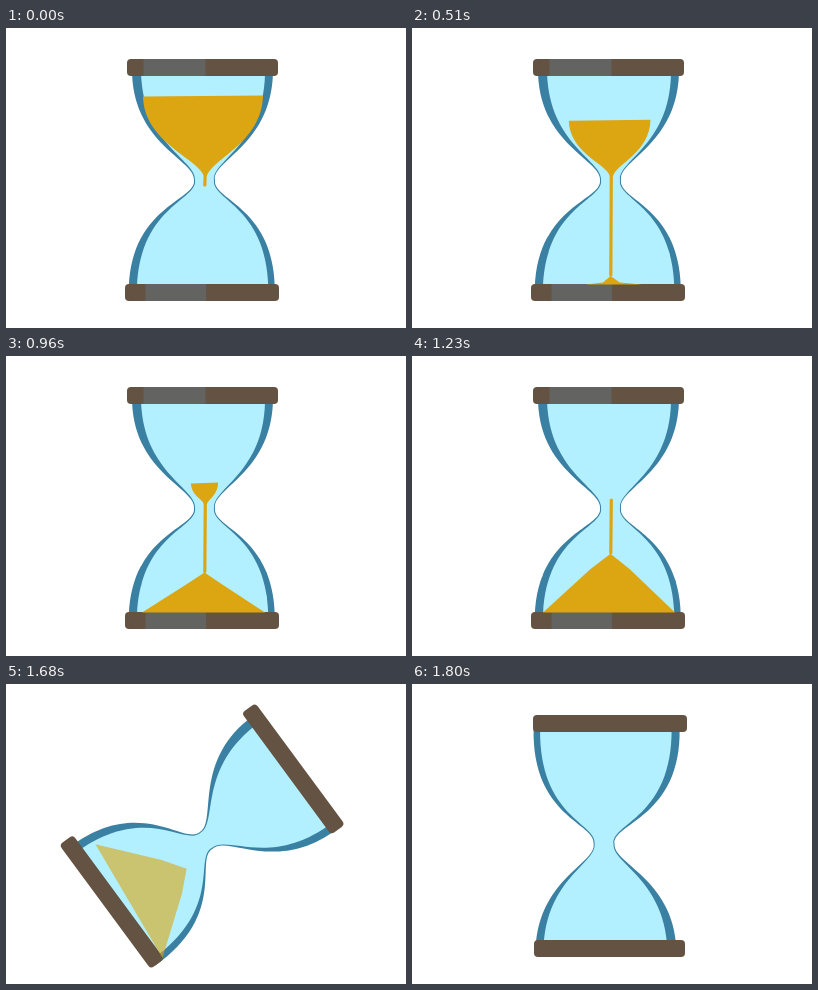
Write an HTML page that moves like this. It is 400x300 px and loops after 1.83 s.

```html
<!DOCTYPE html>
<html lang="en">
<head>
<meta charset="utf-8">
<title>Hourglass</title>
<style>
  html, body { margin: 0; width: 100%; height: 100%; overflow: hidden; background: #fff; }
  svg { display: block; width: 100vw; height: 100vh; }
</style>
</head>
<body>
<svg viewBox="0 0 400 300">
  <g id="glass">
    <path fill="#3a80a3" d="M126 40C125 116 190 132 188 152C191 173 121 178 123 268H269C271 178 206 173 209 152C206 132 268 116 267 40Z"/>
    <path fill="#b3f0ff" d="M135 40C134.5 116 191 132 189 152C192 173 130 178 131 268H262.5C264 178 205 173 208 152C206 132 260.5 116 259 40Z"/>
  </g>
  <g id="bars">
    <g fill="#645242">
      <rect x="121" y="31" width="151" height="17" rx="4"/>
      <rect x="119" y="256" width="154" height="17" rx="4"/>
    </g>
    <g id="shine" fill="#636361">
      <rect x="137.5" y="31" width="62" height="17"/>
      <rect x="139.5" y="256" width="60.5" height="17"/>
    </g>
  </g>
  <g fill="#dba611">
    <path id="upper"/>
    <path id="stream" fill="none" stroke="#dba611" stroke-width="3.2" stroke-linecap="round"/>
    <path id="pile"/>
  </g>
</svg>
<script>
const LOOP = 1830, STEP = 30;
const EMPTY = 1140;                        // the upper sand has run out
const TURN_START = 1612, TURN_END = 1800;
const FLOOR = 256.5, TIP = 148;
const [glass, bars, shine, upper, stream, pile] =
  ['glass', 'bars', 'shine', 'upper', 'stream', 'pile'].map(id => document.getElementById(id));

const clamp = (v, lo = 0, hi = 1) => Math.min(hi, Math.max(lo, v));
const lerp = (a, b, k) => a + (b - a) * k;
const smooth = k => k * k * (3 - 2 * k);

function show(el, on) {
  el.style.display = on ? '' : 'none';
}

function spin(el, angle, x, y) {
  el.setAttribute('transform', `rotate(${angle} ${x} ${y})`);
}

function drawUpper(t) {
  show(upper, t < EMPTY);
  const drained = clamp(t / EMPTY) ** 1.4;
  const y = lerp(68, 143, drained);
  const w = lerp(60, 1, drained);
  const mid = lerp(197, 199, drained);
  const l = mid - w, r = mid + w;
  const y1 = lerp(y, TIP, 0.58), y2 = lerp(y, TIP, 0.78);
  upper.setAttribute('d', `M${l} ${y + 0.5}
    C${lerp(l, 198, 0.02)} ${y1} ${lerp(l, 198, 0.9)} ${y2} 198 ${TIP}
    H201 C${lerp(r, 201, 0.9)} ${y2} ${lerp(r, 201, 0.02)} ${y1} ${r} ${y - 0.5}Z`);
}

// Returns the height of the peak.
function drawPile(t) {
  const h = clamp((t - 390) * 0.07, 0, 66);
  show(pile, h > 0);
  const spread = Math.min(1, Math.sqrt(h / 46));
  const mid = lerp(205, 197, spread);
  const l = mid - 66 * spread, r = mid + 66 * spread;
  const top = FLOOR - h;
  // Slopes start hollow and end slightly rounded.
  const bend = lerp(FLOOR, top, 0.7) - (h * 0.12 - 5);
  pile.setAttribute('d', `M${l} ${FLOOR}L${lerp(l, 198.5, 0.7)} ${bend}L198.5 ${top}
    L${lerp(r, 198.5, 0.7)} ${bend}L${r} ${FLOOR}Z`);
  return top;
}

function drawStream(t, peak) {
  const tail = 144 + Math.max(0, t - 1230) * 0.2;
  const end = Math.min(157 + t * 0.285, peak - 1);
  show(stream, tail < end);
  stream.setAttribute('d', `M199.3 ${tail}L198.8 ${end}`);
}

function drawTurn(t) {
  const k = clamp((t - TURN_START) / (TURN_END - TURN_START));
  const angle = 180 * smooth(k);
  spin(bars, angle, 197, 152);
  spin(glass, angle, 195.3, 156);
  // The sand swings slightly ahead of the glass while it fades.
  spin(pile, angle * 1.11, 194.5, 172);
  pile.setAttribute('opacity', clamp(1 - (t - 1620) / 150));
  show(shine, k < 0.1);
}

function draw(t) {
  drawUpper(t);
  drawStream(t, drawPile(t));
  drawTurn(t);
}

const start = performance.now();
function tick() {
  const t = (performance.now() - start) % LOOP;
  draw(Math.floor(t / STEP) * STEP);
  requestAnimationFrame(tick);
}
tick();
</script>
</body>
</html>
```
